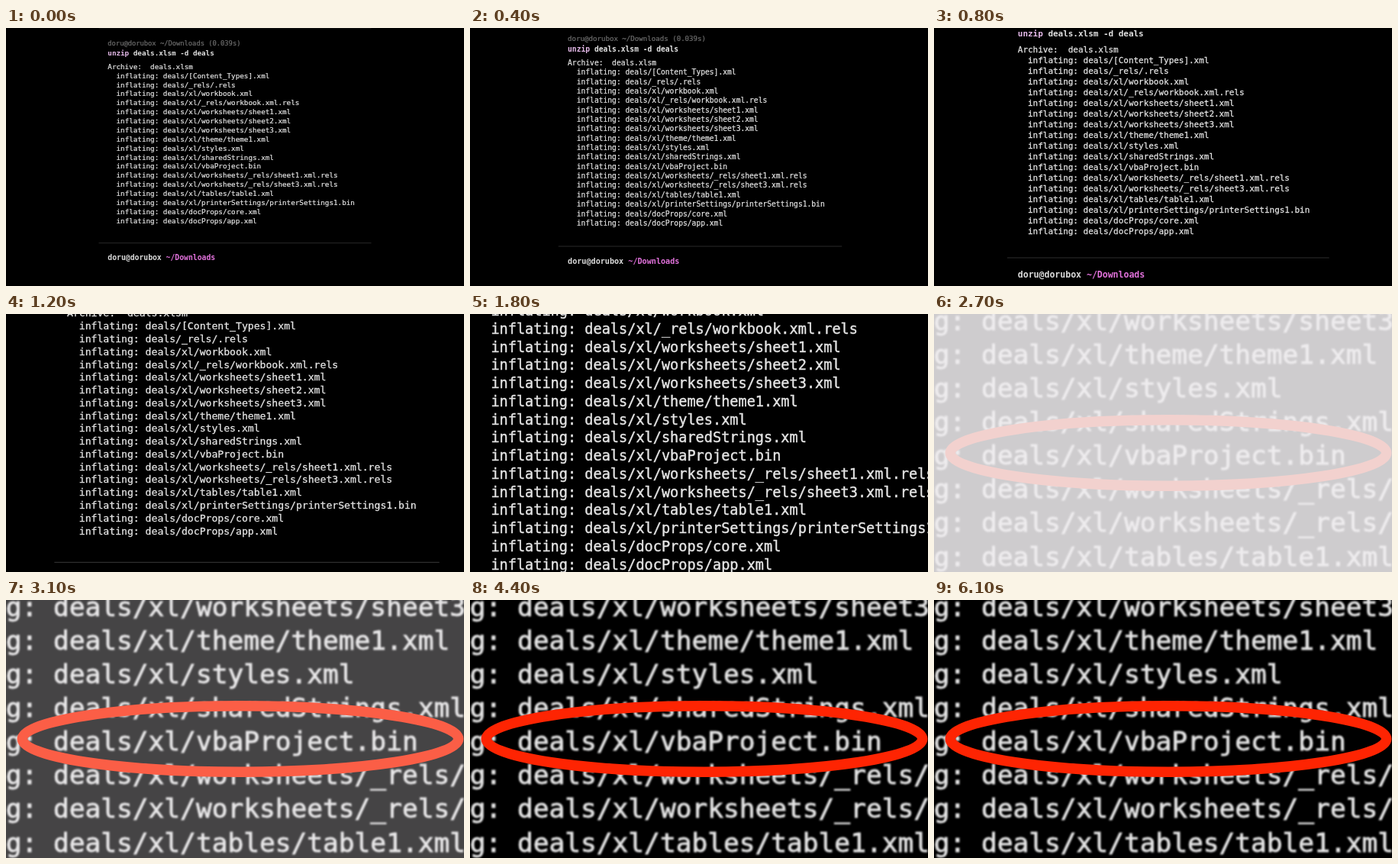
An HTML page that plays this animation: 600 px wide and 338 px high, repeating every 6.5 s.

```html
<!DOCTYPE html>
<html lang="en">
<head>
<meta charset="utf-8">
<title>Archive listing zoom</title>
<style>
  html, body { margin: 0; width: 100%; height: 100%; overflow: hidden; background: #000; }
  svg { display: block; width: 100vw; height: 100vh; }
  text {
    font-family: "DejaVu Sans Mono", monospace; font-size: 9.283px; white-space: pre;
    fill: #e4e4e4; stroke: #e4e4e4; stroke-width: 0.22px;
  }
  .bold { font-weight: bold; stroke: none; }
  .head { font-size: 8.77px; fill: #6c6c6c; stroke: #6c6c6c; }
  .prompt { font-size: 9.75px; font-weight: bold; fill: #dcdcdc; stroke: none; }
  .cmd { fill: #e8bcec; }
  .path { fill: #e272dc; }
  #ring { fill: none; stroke: #fe2402; stroke-width: 13.5px; filter: blur(0.7px); }
</style>
</head>
<body>
<svg viewBox="0 0 600 338">
  <g id="blur"><g id="term"></g></g>
  <ellipse id="ring" cx="307" cy="182" rx="285.7" ry="43.2"/>
  <rect id="flash" width="600" height="338" fill="#f0eef0"/>
</svg>
<script>
const LOOP = 6500, STEP = 100, CUT = 2600;
const CHAR = 5.589, ROW = 11.87, END_SCALE = 3.718;
const NS = "http://www.w3.org/2000/svg";
const [blur, term, ring, flash] = ["blur", "term", "ring", "flash"].map(id => document.getElementById(id));

const files = [
  "[Content_Types].xml", "_rels/.rels", "xl/workbook.xml", "xl/_rels/workbook.xml.rels",
  "xl/worksheets/sheet1.xml", "xl/worksheets/sheet2.xml", "xl/worksheets/sheet3.xml",
  "xl/theme/theme1.xml", "xl/styles.xml", "xl/sharedStrings.xml", "xl/vbaProject.bin",
  "xl/worksheets/_rels/sheet1.xml.rels", "xl/worksheets/_rels/sheet3.xml.rels",
  "xl/tables/table1.xml", "xl/printerSettings/printerSettings1.bin",
  "docProps/core.xml", "docProps/app.xml"
];
const focus = files.indexOf("xl/vbaProject.bin");

function add(parent, tag, attrs, content = "") {
  const el = document.createElementNS(NS, tag);
  for (const name in attrs) el.setAttribute(name, attrs[name]);
  el.textContent = content;
  return parent.appendChild(el);
}

// Each part is [text, class]; the origin is the baseline of the focused row.
function line(y, cls, parts, x = 0) {
  const el = add(term, "text", { x, y, class: cls });
  for (const [str, kind] of parts) add(el, "tspan", { class: kind || "" }, str);
}

function rule(y, stroke) {
  add(term, "line", { x1: -11.8, x2: 345.2, y1: y, y2: y, stroke, "stroke-width": 0.9 });
}

rule(-183.6, "#161616");
line(-161.6, "head", [["doru@dorubox ~/Downloads (0.039s)"]]);
line(-148.2, "bold", [["unzip", "cmd"], [" deals.xlsm -d deals"]]);
line(-(focus + 1) * ROW, "", [["Archive:  deals.xlsm"]]);
files.forEach((name, i) => line((i - focus) * ROW, "", [["inflating: deals/" + name]], 2 * CHAR));
rule(97.3, "#2e2e2e");
line(119.2, "prompt", [["doru@dorubox "], ["~/Downloads", "path"]]);

// The camera distance eases in, then shrinks at a constant speed.
function zoom(t) {
  if (t >= CUT) return END_SCALE;
  const speed = 0.0003465, ease = 713;
  const run = t < ease ? t * t / (2 * ease) : t - ease / 2;
  return Math.min(END_SCALE, 1 / Math.max(0.1, 1 - speed * run));
}

const flashSteps = [[0, 0], [1800, 0], [2300, 1], [2600, 1], [3300, 0], [LOOP, 0]];

function sample(steps, t) {
  const i = steps.findIndex(([time]) => time > t);
  const [t0, a] = steps[i - 1], [t1, b] = steps[i];
  return a + (b - a) * (t - t0) / (t1 - t0);
}

function draw(now) {
  const t = Math.floor((now % LOOP) / STEP) * STEP;
  const k = zoom(t), bow = (k - 1) * (END_SCALE - k);
  const x = 133.3 - 125.6 * (k - 1) - 1.5 * bow;
  const y = 184.4 + 4.7 * (k - 1) + 1.7 * bow;
  term.setAttribute("transform", `translate(${x} ${y}) scale(${k})`);
  blur.style.filter = `blur(${0.2 + 0.3 * (k - 1)}px)`;
  ring.style.visibility = t >= CUT ? "visible" : "hidden";
  flash.setAttribute("opacity", sample(flashSteps, t));
}

const start = performance.now();
function tick() {
  draw(performance.now() - start);
  requestAnimationFrame(tick);
}
tick();
</script>
</body>
</html>
```
